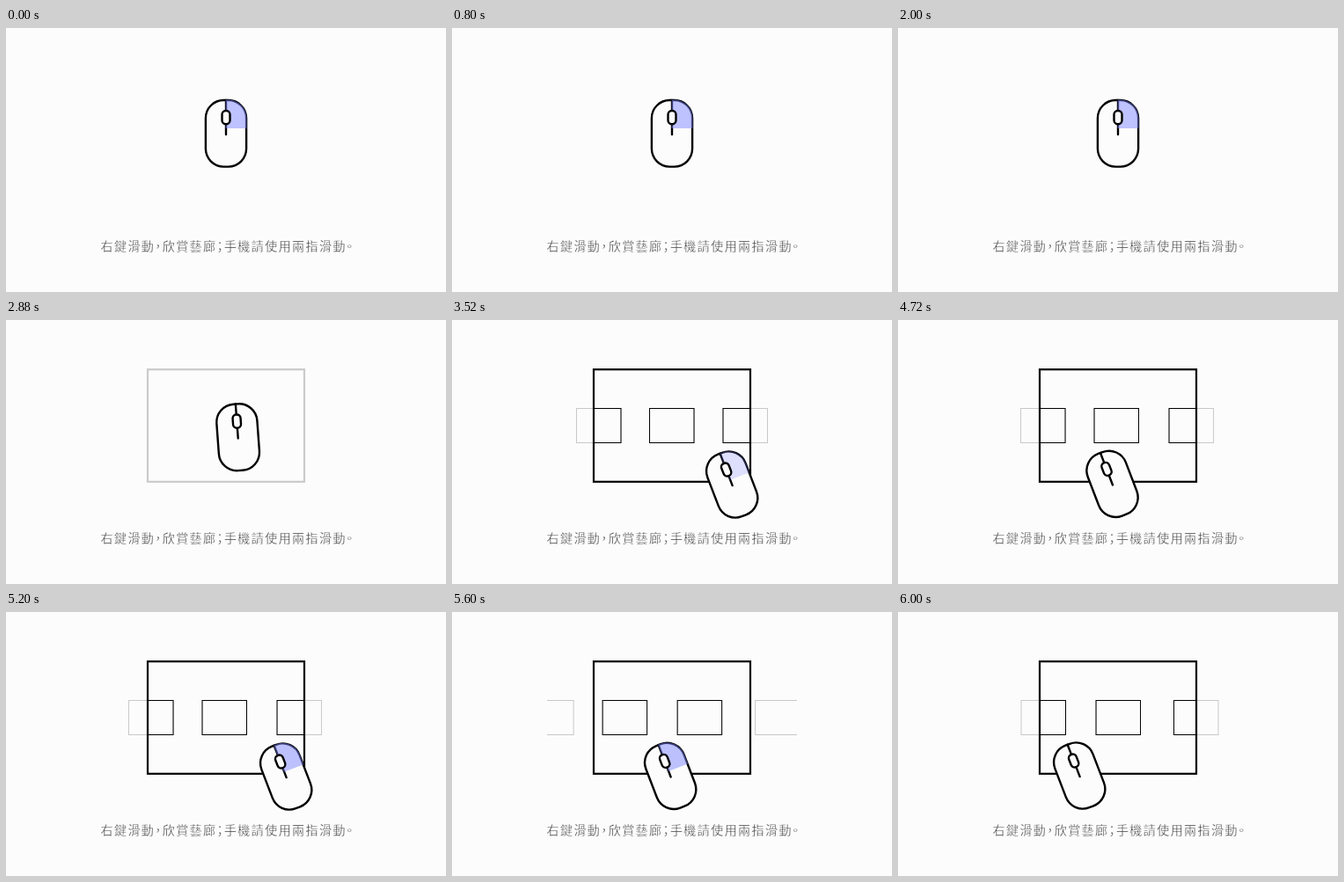
Write an HTML page that moves like this. It is 500 px wide and 300 px high and loops after 6720 ms.

```html
<!DOCTYPE html>
<html lang="zh-TW">
<head>
<meta charset="utf-8">
<style>
  html, body { margin: 0; width: 100%; height: 100%; overflow: hidden; background: #fcfcfc; }
  svg { display: block; width: 100%; height: 100%; }
  /* the background-coloured stroke thins the glyphs */
  text {
    font: 300 14px "Noto Sans CJK TC", "Noto Sans CJK", sans-serif;
    letter-spacing: 1.44px;
    font-feature-settings: "halt";
    fill: #444;
    stroke: #fcfcfc;
    stroke-width: .3px;
  }
</style>
</head>
<body>
<svg viewBox="0 0 500 300" fill="none" stroke="#000">
  <defs>
    <clipPath id="wide"><rect x="108" y="90" width="284" height="60"/></clipPath>
    <clipPath id="inner"><rect x="161" y="56" width="178" height="128"/></clipPath>
    <g id="strip"></g>
  </defs>

  <g id="pictures">
    <g clip-path="url(#wide)" opacity=".2"><use href="#strip"/></g>
    <g clip-path="url(#inner)"><use href="#strip"/></g>
  </g>
  <rect id="frame" x="161" y="56.2" width="178" height="127.6" stroke-width="2.2"/>

  <g id="mouse" stroke-width="2.4" stroke-linecap="round" fill="#fcfcfc">
    <rect x="-23.1" y="-37.8" width="46.2" height="75.6" rx="20.5"/>
    <path d="M0-37.8V-25M0-10V1.2"/>
    <path id="button" d="M-.4-38.2H2.6A21 21 0 0 1 23.6-17.2V-5.8H-.4Z" fill="#7f87ff" stroke="none"/>
    <rect x="-4.5" y="-25.8" width="9" height="15.2" rx="4.2"/>
  </g>

  <text x="107.5" y="253.3">右鍵滑動，欣賞藝廊；手機請使用兩指滑動。</text>
</svg>
<script>
const LOOP = 6720, STEP = 80, FADE = 160;
const DRAG = 640, DRAGS = [3600, 5200];
const $ = id => document.getElementById(id);

const ramp = (t, start, length) => Math.min(1, Math.max(0, (t - start) / length));
const pulse = (t, start, end) => ramp(t, start, FADE) - ramp(t, end - FADE, FADE);

// The button is lit three times alone, then around each drag
const lit = [[-FADE, 400], [600, 1600], [1800, 2560],
  ...DRAGS.map(s => [s - FADE, s + DRAG + FADE])];

// Gaps between pictures widen slightly to the right
for (let i = 0; i < 5; i++) {
  const x = 141.5 + 83 * i + i ** 4 / 32;
  $('strip').innerHTML += `<rect x="${x}" y="100.5" width="50.5" height="39"/>`;
}

function draw(now) {
  const t = Math.floor(now % LOOP / STEP) * STEP;
  const enter = ramp(t, 2800, 400);
  const [first, second] = DRAGS.map(s => ramp(t, s, DRAG));
  const left = first - ramp(t, 4560, 480) + second;
  const press = lit.reduce((sum, [a, b]) => sum + pulse(t, a, b), 0);
  const x = 250 + 68.2 * enter - 112 * left;
  const y = 119.8 + 67.2 * enter - left;

  $('mouse').setAttribute('transform', `translate(${x} ${y}) rotate(${-21 * enter})`);
  $('button').setAttribute('opacity', press / 2);
  $('frame').setAttribute('opacity', enter);
  $('strip').setAttribute('transform', `translate(${-85 * first - 83 * second} 0)`);
  $('pictures').setAttribute('visibility', t < DRAGS[0] - STEP ? 'hidden' : 'visible');
}

const start = performance.now();
function tick() {
  draw(performance.now() - start);
  requestAnimationFrame(tick);
}
tick();
</script>
</body>
</html>
```
